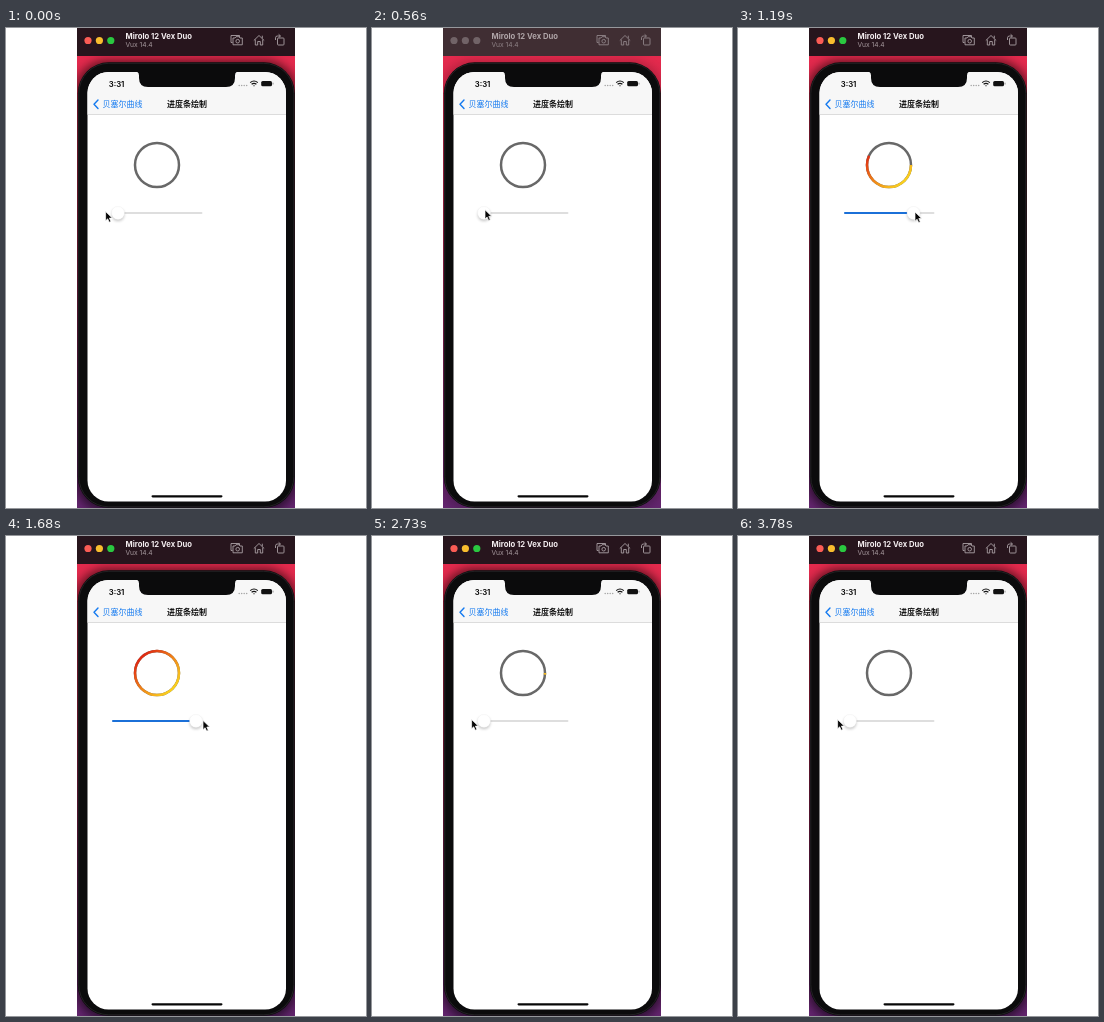
An HTML page for the animation above (3850 ms loop, 360 by 480 pixels).

```html
<!DOCTYPE html>
<html lang="zh-CN">
<head>
<meta charset="utf-8">
<title>进度条绘制</title>
<style>
  html, body { margin: 0; width: 100%; height: 100%; overflow: hidden; background: #fff; }
  svg { display: block; width: 360px; height: 480px; }
  text { font-family: Inter, "Noto Sans CJK SC", "Noto Sans CJK", sans-serif; }
  .cjk { font: 8px "Noto Sans CJK SC", "Noto Sans CJK", sans-serif; }
  #bar { --bar: #27151d; --name: #f4eef0; --sub: #a5989d; --icon: #aaa0a4; }
  #bar.idle { --bar: #402e33; --name: #afa5a8; --sub: #8e8286; --icon: #8f8488; }
  #bar.idle .light { fill: #716367; }
</style>
</head>
<body>
<svg viewBox="0 0 360 480">
  <defs>
    <linearGradient id="desk" x1="0" y1="0" x2="0" y2="1">
      <stop offset="0" stop-color="#e42a4d"/>
      <stop offset=".3" stop-color="#c9274e"/>
      <stop offset=".7" stop-color="#8a2460"/>
      <stop offset="1" stop-color="#63256f"/>
    </linearGradient>
    <linearGradient id="heat" gradientUnits="userSpaceOnUse" x1="128" y1="114" x2="174" y2="160">
      <stop offset=".1" stop-color="#dc1c12"/>
      <stop offset=".5" stop-color="#f08318"/>
      <stop offset=".9" stop-color="#fbdc20"/>
    </linearGradient>
    <filter id="blur" x="-20%" y="-20%" width="140%" height="140%"><feGaussianBlur stdDeviation="5"/></filter>
    <filter id="soft" x="-50%" y="-50%" width="200%" height="200%"><feGaussianBlur stdDeviation="1.5"/></filter>
    <clipPath id="window"><rect x="71" width="218" height="480"/></clipPath>
    <clipPath id="screen"><rect x="81.5" y="44" width="198.5" height="429.5" rx="21"/></clipPath>
  </defs>

  <g clip-path="url(#window)">
    <rect x="71" y="27" width="218" height="453" fill="url(#desk)"/>
    <rect id="shade" x="69" y="32" width="222" height="452" rx="32" filter="url(#blur)"/>
    <rect x="71.8" y="34.3" width="217" height="445.5" rx="31" fill="#0b0b0c"/>
    <rect x="72.8" y="35.3" width="215" height="443.5" rx="30" fill="none" stroke="#29282a" stroke-width=".8"/>
  </g>

  <g id="bar">
    <rect x="71" width="218" height="28" fill="var(--bar)"/>
    <circle class="light" cx="82" cy="12.5" r="3.6" fill="#fb5c55"/>
    <circle class="light" cx="93.4" cy="12.5" r="3.6" fill="#f9bd2e"/>
    <circle class="light" cx="104.8" cy="12.5" r="3.6" fill="#2ac840"/>
    <text x="119.5" y="11.3" font-size="7.7" font-weight="700" fill="var(--name)">Mirolo 12 Vex Duo</text>
    <text x="119.5" y="19.3" font-size="6.7" fill="var(--sub)">Vux 14.4</text>
    <g fill="none" stroke="var(--icon)" stroke-width=".9" stroke-linejoin="round">
      <path d="M226.5 14.5h-1.5v-7h8.5v1.7"/>
      <path d="M227 10h2l1-1.3h3l1 1.3h2.3v6.8H227z"/>
      <circle cx="231.7" cy="13.2" r="1.8"/>
      <path d="M247.8 12.5l5.2-5 5.2 5M249.3 11.5v5.5h2.4v-3.5h2.6V17h2.4v-5.5M256.3 10.3V7.7"/>
      <rect x="271.5" y="10" width="6.5" height="7" rx=".8"/>
      <path d="M269.5 12v-2.2q0-1.8 2-1.8h2.8M272.6 6.3L274.5 8l-1.9 1.7"/>
    </g>
  </g>

  <g clip-path="url(#screen)">
    <rect x="81" y="44" width="200" height="430" fill="#fff"/>
    <rect x="81" y="44" width="200" height="42.3" fill="#f7f7f7"/>
    <path d="M81 86.5h200" stroke="#cfcfcf" stroke-width=".7"/>
    <path d="M129 43.5q4 0 4 4v2.5q0 9 9 9h78q9 0 9-9v-2.5q0-4 4-4z" fill="#0b0b0c"/>
  </g>
  <text x="102.7" y="58.6" font-size="7.8" font-weight="600">3:31</text>
  <g fill="#a3a3a3">
    <circle cx="233.2" cy="57.6" r=".75"/><circle cx="235.7" cy="57.6" r=".75"/>
    <circle cx="238.2" cy="57.6" r=".75"/><circle cx="240.7" cy="57.6" r=".75"/>
  </g>
  <g fill="none" stroke="#111" stroke-width="1.2">
    <path d="M244.2 54.6q3.8-3.2 7.6 0M245.6 56.3q2.4-2 4.8 0"/>
    <path d="M246.9 57.4h2.2L248 58.6z" fill="#111" stroke="none"/>
  </g>
  <rect x="255.2" y="52.9" width="10.8" height="5.4" rx="1.5" fill="#111"/>
  <path d="M267 54.7v1.8" stroke="#777" stroke-width=".8"/>
  <path d="M92 72l-4 4.3 4 4.3" fill="none" stroke="#147af0" stroke-width="1.4" stroke-linecap="round" stroke-linejoin="round"/>
  <text class="cjk" x="96.5" y="79.3" fill="#147af0">贝塞尔曲线</text>
  <text class="cjk" x="161" y="79.3" style="font-weight:700" fill="#111">进度条绘制</text>
  <rect x="145.5" y="467.2" width="71" height="2.3" rx="1.15" fill="#080808"/>

  <g fill="none" stroke-width="2.5">
    <circle cx="151" cy="137" r="22" stroke="#686868"/>
    <circle id="ring" cx="151" cy="137" r="22" stroke="url(#heat)" pathLength="1"/>
  </g>

  <path d="M107 185h88.5" stroke="#dedede" stroke-width="1.9" stroke-linecap="round"/>
  <path id="fill" stroke="#1b70d8" stroke-width="2" stroke-linecap="round"/>
  <g id="thumb">
    <circle cy="1.8" r="6.3" opacity=".23" filter="url(#soft)"/>
    <circle r="6.5" fill="#fff" stroke="#e9e9e9" stroke-width=".3"/>
  </g>
  <path id="cursor" d="M0 0v9.2l2.1-2 1.5 3.4 1.7-.7-1.5-3.4h2.9z" fill="#080808" stroke="#fff" stroke-width=".7"/>
</svg>
<script>
const LOOP = 3850, STEP = 70;
const $ = id => document.getElementById(id);

// Rows are [ms, value, ...]
const pointer = [
  [0, 99.6, 183.6], [70, 99.6, 183.6], [490, 113, 181.8], [700, 113, 182],
  [1190, 177, 184], [1400, 197, 184.5], [1820, 197, 184.5],
  [2240, 139, 184], [2520, 107, 184], [2660, 99.6, 183.6]
];
const slider = [[700, 112], [1190, 175.5], [1330, 190], [1890, 190], [2240, 140.5], [2520, 112]];
const progress = [[770, 0], [1190, .57], [1540, 1], [1960, 1], [2240, .63], [2730, .012], [2800, 0]];

function sample(rows, t) {
  const i = rows.findIndex(row => row[0] > t);
  if (i < 0) return rows[rows.length - 1].slice(1);
  if (i === 0) return rows[0].slice(1);
  const a = rows[i - 1], b = rows[i], k = (t - a[0]) / (b[0] - a[0]);
  return a.slice(1).map((v, n) => v + (b[n + 1] - v) * k);
}

function draw(t) {
  const [px, py] = sample(pointer, t);
  const [x] = sample(slider, t);
  const [p] = sample(progress, t);
  const idle = t >= 70 && t < 630;

  $('bar').classList.toggle('idle', idle);
  $('shade').setAttribute('opacity', idle ? .2 : .55);
  $('cursor').setAttribute('transform', `translate(${px} ${py})`);
  $('thumb').setAttribute('transform', `translate(${x} 185)`);
  $('fill').setAttribute('d', x > 112 ? `M107 185H${x}` : '');
  $('ring').setAttribute('stroke-dasharray', `${p} 2`);
  $('ring').style.visibility = p > 0 ? 'visible' : 'hidden';
}

const start = performance.now();
function tick() {
  const t = (performance.now() - start) % LOOP;
  draw(Math.floor(t / STEP) * STEP);
  requestAnimationFrame(tick);
}
tick();
</script>
</body>
</html>
```
